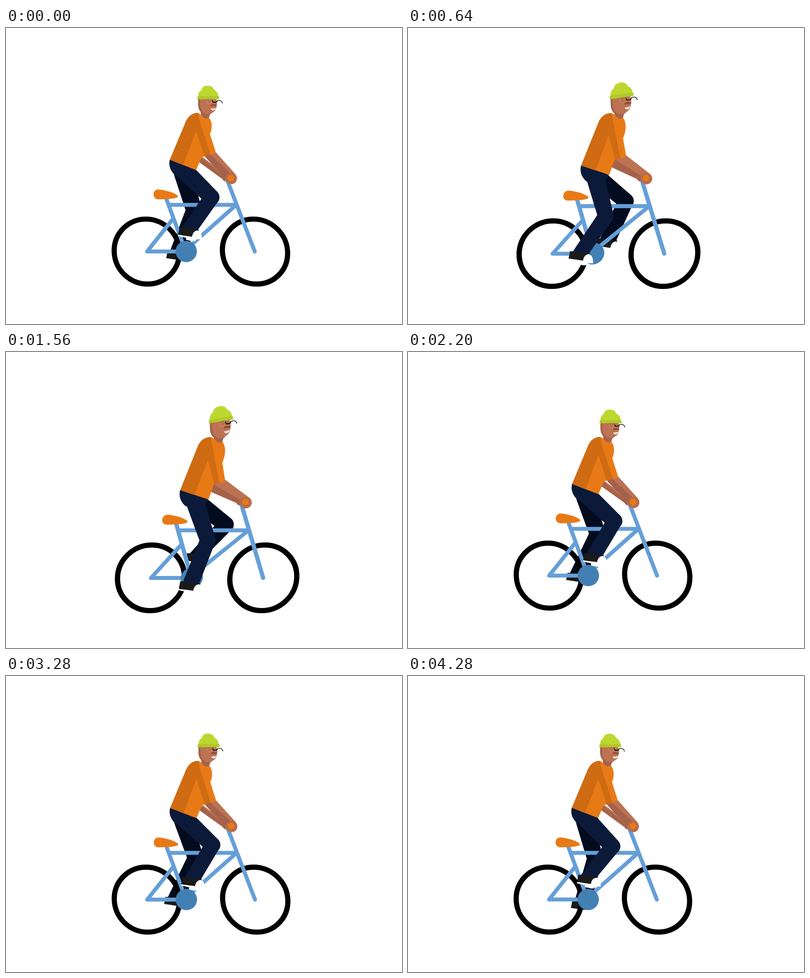
Animation of 800 by 600 pixels, one loop 4.32 s. Source, as an HTML page with a canvas:

```html
<!DOCTYPE html>
<html lang="en">
<head>
<meta charset="utf-8">
<title>Cyclist</title>
<style>
  html, body { margin: 0; width: 100%; height: 100%; overflow: hidden; background: #fff; }
  canvas { display: block; }
</style>
</head>
<body>
<canvas id="stage" width="800" height="600"></canvas>
<script>
const ctx = document.getElementById('stage').getContext('2d');
const LOOP = 4320, TURN = 1080, STEP = 40, TAU = Math.PI * 2;
const ORANGE = '#e87a16', RUST = '#ce6b13', SKIN = '#bc7253', SHADE = '#a4624a';
const BLUE = '#659fd7', NAVY = '#0c1a3a', NIGHT = '#030b1e', BLACK = '#1a1a1a';

let sway = 0; // 0 leaning back, 1 leaning forward

const mix = (a, b) => a + (b - a) * sway;
const at = ([x0, y0, x1, y1]) => [mix(x0, x1), mix(y0, y1)];

function poly(points, color) {
  ctx.fillStyle = color;
  ctx.beginPath();
  points.forEach(([x, y]) => ctx.lineTo(x, y));
  ctx.closePath();
  ctx.fill();
}

const swayPoly = (points, color) => poly(points.map(at), color);

function dot(x, y, r, color) {
  ctx.fillStyle = color;
  ctx.beginPath();
  ctx.arc(x, y, r, 0, TAU);
  ctx.fill();
}

function line(d, color, width) {
  ctx.strokeStyle = color;
  ctx.lineWidth = width;
  ctx.stroke(new Path2D(d));
}

function shape(d, color) {
  ctx.fillStyle = color;
  ctx.fill(new Path2D(d));
}

// Runs draw with (ox, oy) carried to (tx, ty) and a linear map around it.
function mapped(ox, oy, tx, ty, a, b, c, d, draw) {
  ctx.save();
  ctx.transform(a, b, c, d, tx, ty);
  ctx.translate(-ox, -oy);
  draw();
  ctx.restore();
}

function wheel(x0, x1, skew) {
  mapped(0, 0, mix(x0, x1), mix(453.2, 457.8), 1 + 0.027 * sway, 0, mix(skew, -skew), 1 + 0.01 * sway, () => {
    ctx.strokeStyle = '#000';
    ctx.lineWidth = 10.4;
    ctx.beginPath();
    ctx.arc(0, 0, 65.8, 0, TAU);
    ctx.stroke();
  });
}

function bike() {
  wheel(284.3, 292.8, 0.027);
  wheel(503, 519.8, 0.05);
  const [hx, hy] = at([285, 453, 293, 458]);
  mapped(285, 453, hx, hy, 1 + 0.0414 * sway, 0, -0.1007 * sway, 1 + 0.021 * sway, () => {
    ctx.lineCap = ctx.lineJoin = 'round';
    line('M364 453H285L338 386M324 347L361 447M329 358.5H465L367 446M447 309L502.5 453', BLUE, 8);
    dot(364, 453, 21.6, '#4280b4');
    ctx.translate(-2.5 * sway, 0);
    shape('M298 337.5C298 331 303 327 308 327.3C320 328.5 336 332 346 339C349 341.5 347 343.5 343 344.5' +
      'C334 347 318 347 307 347.2C302 347 298 343 298 337.5Z', ORANGE);
  });
}

function shoe(x, y) {
  const k = 1 + 0.04 * sway;
  mapped(0, 0, x, y, k, 0, 0, k, () => {
    shape('M-24 5L24 11L24 14L13 14Q11 19 5 18L-8 15L-8 11L-24 7.5Z', '#fff');
    shape('M-21 -10L17 -6L18 -3L6 9L-24 4.5Z', BLACK);
    shape('M4 9Q6 -3 15 -4Q24 -2 24 13Z', '#fff');
  });
}

function knee([hx, hy], [ax, ay], thigh, shin) {
  const dx = ax - hx, dy = ay - hy;
  const d = Math.min(Math.hypot(dx, dy), thigh + shin - 0.1);
  const bend = Math.acos((thigh * thigh + d * d - shin * shin) / (2 * thigh * d));
  const angle = Math.atan2(dy, dx) - bend;
  return [hx + thigh * Math.cos(angle), hy + thigh * Math.sin(angle)];
}

function limb([x0, y0], [x1, y1], w0, w1, color) {
  const a = Math.atan2(y1 - y0, x1 - x0), nx = -Math.sin(a), ny = Math.cos(a);
  poly([[x0 + nx * w0, y0 + ny * w0], [x1 + nx * w1, y1 + ny * w1],
    [x1 - nx * w1, y1 - ny * w1], [x0 - nx * w0, y0 - ny * w0]], color);
}

// The shin looks longer at the bottom of the stroke by the given stretch.
function leg(turn, { start, hip, thigh, shin, stretch, shift, color }) {
  const angle = turn + start * Math.PI / 180, crank = mix(28, 29.5);
  const x = mix(363.5, 375.5) + shift + crank * Math.sin(angle);
  const y = mix(453, 458) - 12.5 - crank * Math.cos(angle);
  const ankle = [x, y - 7];
  const k = knee(hip, ankle, thigh, shin - stretch * Math.cos(angle));
  shoe(x, y);
  limb(hip, k, 18.5, 16, color);
  dot(k[0], k[1], 16, color);
  const a = Math.atan2(ankle[1] - k[1], ankle[0] - k[0]);
  const nx = Math.sin(a) * 15.5, ny = -Math.cos(a) * 15.5;
  poly([[k[0] + nx, k[1] + ny], [x + 16, y - 5], [x - 16.5, y - 9], [k[0] - nx, k[1] - ny]], color);
}

function pelvis() {
  const p = at([331, 266, 352, 279]), q = at([326, 285, 347, 298]), r = at([343, 300, 362, 312]);
  const s = at([366, 310, 398, 320]), u = at([384, 288, 408, 299]);
  ctx.fillStyle = NAVY;
  ctx.beginPath();
  ctx.moveTo(...p);
  ctx.quadraticCurveTo(...q, ...r);
  ctx.lineTo(...s);
  ctx.lineTo(...u);
  ctx.fill();
}

function farArm() {
  swayPoly([[396, 261, 420, 267], [389, 271, 413, 283], [437, 306, 468, 307], [447, 299, 476, 299]], SKIN);
  swayPoly([[394, 263, 420, 270], [389, 271, 413, 283], [437, 306, 468, 307], [442, 302, 472, 303]], SHADE);
  dot(mix(443.5, 472), 304.5, 6.5, SHADE);
}

function nearArm() {
  swayPoly([[402, 260, 419, 267], [424, 252, 443, 259], [464, 297, 491, 295], [447, 309, 473, 308], [404, 263, 414, 282]], SKIN);
  swayPoly([[402, 260, 419, 267], [412, 256, 421, 269], [457, 298, 475, 301], [447, 309, 472, 308], [404, 263, 414, 282]], SHADE);
  const x = mix(455, 484.5);
  dot(x, 305, mix(11.5, 12), '#b76d50');
  dot(x - 0.8, 304, 8, SHADE);
  dot(x - 0.8, 304, 7, ORANGE);
}

function torso() {
  const back = () => {
    const a = at([361, 195, 386, 195]), b = at([369, 172, 394, 172]), c = at([388, 172, 414, 172.5]);
    ctx.moveTo(...at([331, 267, 352, 280]));
    ctx.lineTo(...a);
    ctx.quadraticCurveTo(...b, ...c);
  };
  const to = (...p) => ctx.lineTo(...at(p));

  ctx.fillStyle = ORANGE;
  ctx.beginPath();
  back();
  to(394, 176, 421, 176);
  ctx.quadraticCurveTo(...at([401, 187, 428, 188]), ...at([410, 182, 437, 182]));
  ctx.bezierCurveTo(...at([417, 190, 444, 190]), ...at([417, 205, 445, 206]), ...at([412, 215, 437, 225]));
  to(424, 253, 443, 262);
  to(412, 257, 432, 265);
  to(395, 262, 420, 268);
  to(384, 288, 409, 299);
  ctx.fill();

  ctx.fillStyle = RUST;
  ctx.beginPath();
  back();
  to(390, 185, 416, 185);
  to(413, 256, 431, 265);
  to(401, 261, 421, 268);
  to(384, 208, 408, 218);
  to(358, 278, 381, 290);
  ctx.fill();
}

function neck() {
  swayPoly([[393, 168, 420, 168], [394, 177, 420, 177], [402, 185, 429, 185],
    [410, 182, 437, 183], [413, 170, 440, 170]], SHADE);
}

function head() {
  const [x, y] = at([387, 144, 410.5, 144]);
  mapped(387, 144, x, y, 1 + 0.105 * sway, -0.18 * sway, 0.04 * sway, 1 + 0.13 * sway, () => {
    shape('M388 142V155C388 167 395 175 405 177Q411 177 415 173L418 142Z', SHADE);
    shape('M392 142V155C392 167 399 173.5 406 174.5C418 174 424 168 425 160L426 153L424 142Z', SKIN);
    shape('M414 155Q420 153 426 156L425 159Q419 157 413 158.5Z', '#8f4c36');
    shape('M413.5 163.5Q419 164 424 162Q422 167 418 167Q415 167 413.5 163.5Z', '#fff');
    ctx.lineCap = 'butt';
    line('M406 146Q411 142 417 146', '#6e3c2c', 1.6);
    line('M405.5 149a5.5 5.2 0 1 0 11 0a5.5 5.2 0 1 0 -11 0', '#d99a7c', 0.8);
    line('M416.5 147L418 150.5H425L426.5 147', '#151515', 1.8);
    line('M425 149Q428 146 432 147Q437 148.5 437 153', '#333', 1.4);
    shape('M388 140C388 133 390 128 394.5 126C396 119 401 117 407 117C413 117 418 119 420 125' +
      'C426 128 429 133 429 140Z', '#bed730');
    shape('M389 138H428Q430.5 138 430.5 141V144.5H386.5V141Q386.5 138 389 138Z', '#b0c829');
  });
}

function draw(now) {
  const t = Math.floor((now % LOOP) / STEP) * STEP;
  const turn = t / TURN * TAU;
  sway = (1 - Math.cos((t + 20) / TURN * TAU)) / 2 / 0.9865;

  ctx.fillStyle = '#fff';
  ctx.fillRect(0, 0, 800, 600);
  farArm();
  leg(turn, {
    start: 220, hip: at([357, 292, 374, 295]), thigh: mix(80, 89),
    shin: 88, stretch: 5, shift: 2, color: NIGHT
  });
  bike();
  leg(turn, {
    start: 20, hip: at([351, 280, 379, 296]), thigh: 90,
    shin: 85, stretch: 8, shift: -1.5, color: NAVY
  });
  pelvis();
  nearArm();
  neck();
  torso();
  head();
}

const begin = performance.now();
function tick() {
  draw(performance.now() - begin);
  requestAnimationFrame(tick);
}
tick();
</script>
</body>
</html>
```
